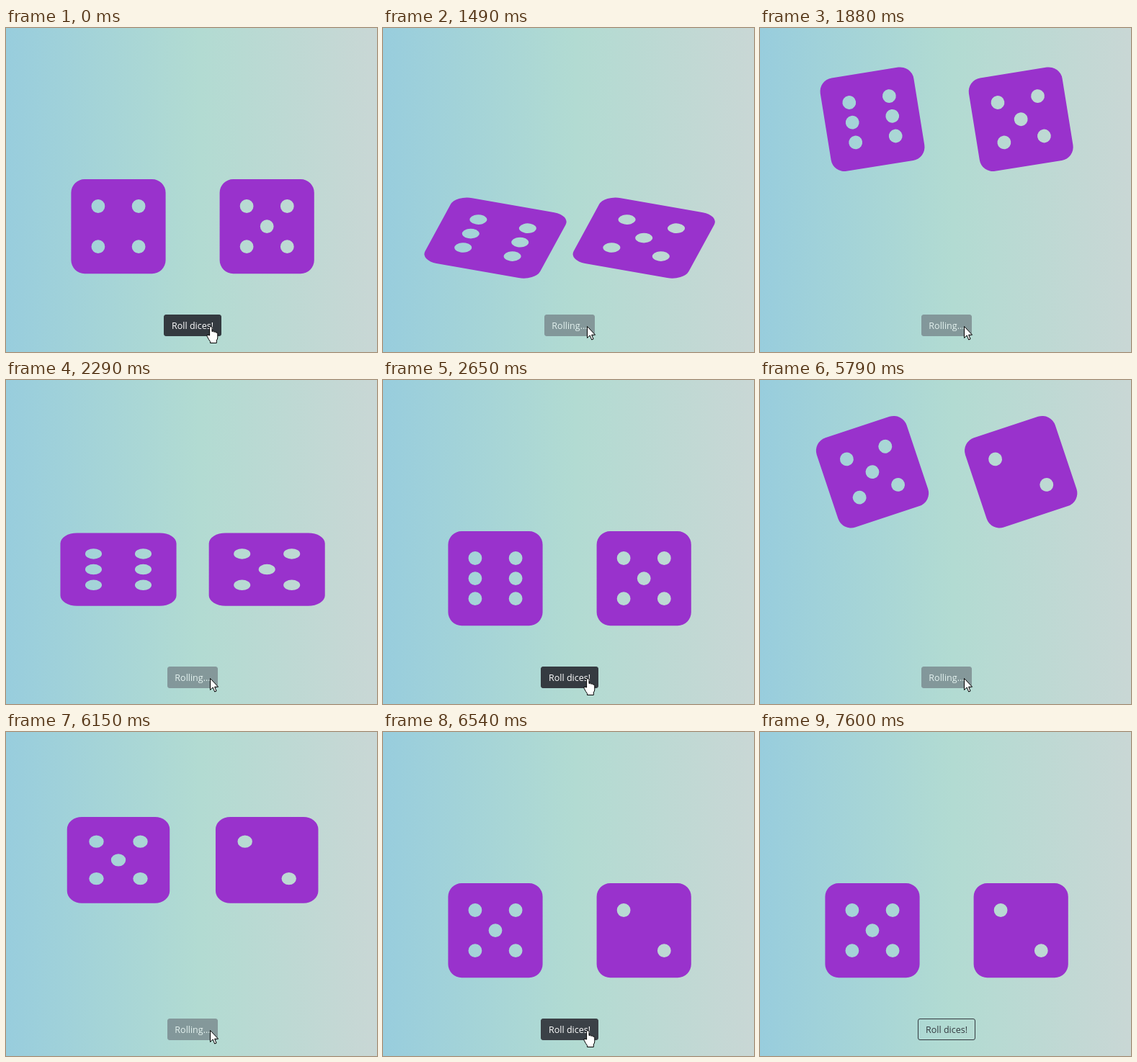
Animation of 515x450 px, one loop 8990 ms. Source, as an HTML page:

```html
<!DOCTYPE html>
<html lang="en">
<head>
<meta charset="utf-8">
<title>Roll dices</title>
<style>
  html, body { margin: 0; width: 100%; height: 100%; overflow: hidden; }
  body { background: linear-gradient(to right, #98cddd, #b2dbd2 52%, #c9d7d5); }
  svg { display: block; }
  text { font: 12.5px "Open Sans", "Noto Sans", sans-serif; text-anchor: middle; }
</style>
</head>
<body>
<svg width="515" height="450" viewBox="0 0 515 450">
  <g fill="#9932cc" fill-rule="evenodd">
    <path class="die"/>
    <path class="die"/>
  </g>
  <g id="button">
    <rect y="398.5" height="29" rx="2.5"/>
    <text x="259" y="418"></text>
  </g>
  <g id="cursor" fill="#fff" stroke="#000" stroke-linejoin="round">
    <path id="hand" d="M282.6 427V416.3a1.7 1.7 0 0 1 3.4 0v5.2q1.8-1 2.7.6 1.8-.8 2.7.8 2.2-.5 2.4 1.8v5.3q0 2-1.5 4v3.5h-8.8v-2q-2-2.5-4.5-7.5-.6-2 1.2-1.8z"/>
    <path id="arrow" d="M283.5 414.5v16l3.7-3.5 2.5 6 2.4-1-2.5-5.8h5z"/>
  </g>
</svg>
<script>
const $ = s => document.querySelector(s);
const dice = document.querySelectorAll('.die');
const box = $('rect'), label = $('text');

const LOOP = 8990;
const LEAVE = 7330;
const ENABLE = 1155;   // time after the click when the button comes back
const ROLLS = [
  { start: -2000, faces: [4, 5] },
  { start: 1366, faces: [6, 5] },
  { start: 5296, faces: [5, 2] }
];
// the screen refreshes only at these times
const TICKS = [0, 1370, 1490, 1610, 1760, 1880, 2000, 2140, 2290, 2410, 2530, 2650,
  5310, 5430, 5550, 5670, 5790, 5910, 6030, 6150, 6270, 6420, 6540, 7360, 7480, 7600];

function bezier(x1, y1, x2, y2) {
  const at = (a, b, s) => 3 * a * s * (1 - s) ** 2 + 3 * b * s * s * (1 - s) + s ** 3;
  return x => {
    if (x <= 0) return 0;
    if (x >= 1) return 1;
    let lo = 0, hi = 1;
    for (let i = 0; i < 24; i++) {
      const mid = (lo + hi) / 2;
      if (at(x1, x2, mid) < x) lo = mid; else hi = mid;
    }
    return at(y1, y2, lo);
  };
}
const ease = bezier(.25, .1, .25, 1);
const easeOut = bezier(0, 0, .58, 1);

// keys: [time, value, easing towards this key]
function track(keys, t) {
  for (let i = 1; i < keys.length; i++) {
    const [t0, v0] = keys[i - 1], [t1, v1, fn = ease] = keys[i];
    if (t < t1) return v0 + (v1 - v0) * fn((t - t0) / (t1 - t0));
  }
  return keys[keys.length - 1][1];
}
const LIFT = [[0, 0], [110, 19], [550, -149.5], [807, -149.5], [1036, 19], [1110, 0]];
const SQUASH = [[0, 0], [110, .28], [550, 0], [807, 0], [1036, .28], [1110, 0]];
const SPIN = [[0, 0], [110, 0], [620, 376, easeOut], [807, 360]];

const dot = (x, y) => `M${x * 28.1 - 9.4} ${y * 28.1}a9.4 9.4 0 1 0 18.8 0a9.4 9.4 0 1 0-18.8 0z`;
function face(n) {
  let d = 'M-46.8-65.6h93.6a18.8 18.8 0 0 1 18.8 18.8v93.6a18.8 18.8 0 0 1-18.8 18.8' +
    'h-93.6a18.8 18.8 0 0 1-18.8-18.8v-93.6a18.8 18.8 0 0 1 18.8-18.8z';
  if (n % 2) d += dot(0, 0);
  if (n > 1) d += dot(-1, -1) + dot(1, 1);
  if (n > 3) d += dot(1, -1) + dot(-1, 1);
  if (n > 5) d += dot(-1, 0) + dot(1, 0);
  return d;
}

const DARK = [52, 58, 64], GREY = [108, 117, 125], WHITE = [255, 255, 255];
const mix = (a, b, p) => a.map((v, i) => v + (b[i] - v) * p);
const rgb = (c, alpha = 1) => `rgba(${c.map(Math.round)},${alpha})`;

function drawButton(t, age) {
  const rolling = age < ENABLE;
  const left = t >= LEAVE ? ease((t - LEAVE) / 150) : 0;
  const width = rolling ? 69 : 79;
  const fill = rolling ? mix(DARK, GREY, ease(age / 150))
                       : mix(GREY, DARK, ease((age - ENABLE) / 150));
  box.setAttribute('x', 259 - width / 2);
  box.setAttribute('width', width);
  box.setAttribute('fill', rgb(fill, 1 - left));
  box.setAttribute('stroke', rgb(fill));
  label.setAttribute('fill', rgb(mix(WHITE, DARK, left)));
  label.textContent = rolling ? 'Rolling...' : 'Roll dices!';
  $('#button').setAttribute('opacity', rolling ? .65 : 1);
}

function drawCursor(t, age) {
  const away = Math.max(0, t - LEAVE);
  const hand = age >= ENABLE && !away;
  $('#hand').style.display = hand ? '' : 'none';
  $('#arrow').style.display = hand ? 'none' : '';
  $('#cursor').setAttribute('transform', `translate(${Math.min(away * .08, 10)} ${away * .22})`);
}

function draw(t) {
  const roll = ROLLS.filter(r => r.start <= t).pop();
  const age = t - roll.start;
  const q = track(SQUASH, age);
  dice.forEach((die, i) => {
    die.setAttribute('d', face(roll.faces[i]));
    die.setAttribute('transform', `translate(${156 + i * 206.2} ${275.6 + track(LIFT, age)})` +
      ` scale(${1 + q} ${1 - q}) rotate(${track(SPIN, age)})`);
  });
  drawButton(t, age);
  drawCursor(t, age);
}

function loop() {
  const t = performance.now() % LOOP;
  draw(TICKS.filter(k => k <= t).pop());
  requestAnimationFrame(loop);
}
loop();
</script>
</body>
</html>
```
